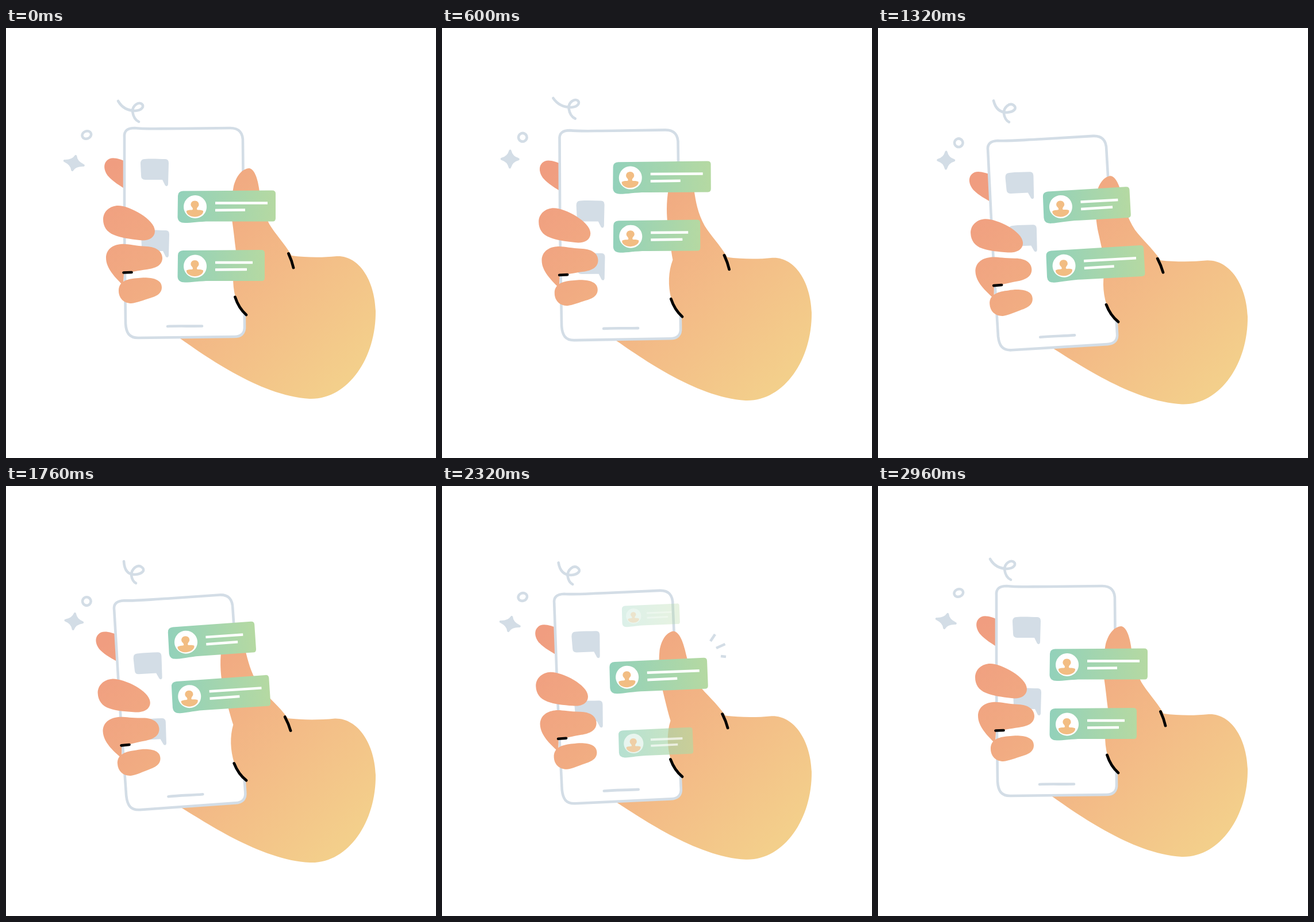
Write an HTML page with a canvas that moves like this. It is 748 px wide and 748 px high and loops after 3000 ms.

```html
<!DOCTYPE html>
<html lang="en">
<head>
<meta charset="utf-8">
<title>Phone in hand</title>
<style>
html, body { margin: 0; width: 100%; height: 100%; overflow: hidden; background: #fff; }
canvas { display: block; }
</style>
</head>
<body>
<canvas id="stage" width="748" height="748"></canvas>
<script>
const ctx = document.getElementById('stage').getContext('2d');
const LOOP = 3000, STEP = 40;
const GREY = '#d3dde6', SKIN = '#f2bd83';
const PIVOT = { x: 466, y: 500 };
const KEYS = [0, 600, 1000, 1320, 1760, 2320, 2960];

const clamp = v => Math.max(0, Math.min(1, v));
const mix = (a, b, k) => a + (b - a) * k;
const ease = v => (1 - Math.cos(Math.PI * clamp(v))) / 2;

// Smooth curve through keyed values, flat at both ends
function track(t, vals, keys = KEYS) {
  const last = keys.length - 1;
  if (t <= keys[0]) return vals[0];
  if (t >= keys[last]) return vals[last];
  let i = 0;
  while (t >= keys[i + 1]) i++;
  const slope = n => n === 0 || n === last ? 0
    : (vals[n + 1] - vals[n - 1]) / (keys[n + 1] - keys[n - 1]);
  const d = keys[i + 1] - keys[i], u = (t - keys[i]) / d, v = 1 - u;
  return vals[i] * (1 + 2 * u) * v * v + slope(i) * d * u * v * v
    + vals[i + 1] * u * u * (3 - 2 * u) - slope(i + 1) * d * u * u * v;
}

function fill(d, style) {
  ctx.fillStyle = style;
  ctx.fill(typeof d === 'string' ? new Path2D(d) : d);
}

function stroke(d, color = GREY, width = 4.6, cap = 'round') {
  ctx.strokeStyle = color;
  ctx.lineWidth = width;
  ctx.lineCap = cap;
  ctx.lineJoin = 'round';
  ctx.stroke(typeof d === 'string' ? new Path2D(d) : d);
}

function rotate(x, y, cx, cy, a) {
  const c = Math.cos(a), s = Math.sin(a), dx = x - cx, dy = y - cy;
  return [cx + dx * c - dy * s, cy + dx * s + dy * c];
}

function warp(d, fn) {
  return new Path2D(d.replace(/(-?[\d.]+) (-?[\d.]+)/g, (_, x, y) => fn(+x, +y).join(' ')));
}

function skin(dy) {
  const g = ctx.createLinearGradient(210, 210 + dy, 600, 600 + dy);
  g.addColorStop(0, '#f09d80');
  g.addColorStop(.33, '#f1ab82');
  g.addColorStop(.65, '#f3bc87');
  g.addColorStop(1, '#f3cf8b');
  return g;
}

const ARM = 'M290 531 C340 566 440 640 528 645 C594 647 644 575 643 492 C641 437 613 395 575 397 ' +
  'C548 400 520 399 497 396 L440 420 L400 500 Z';
const THUMB = 'M497 396 C484 374 468 358 458 341 C446 318 443 300 440 278 C437 258 431 245 423 244 ' +
  'C409 245 400 260 396 275 C391 300 392 325 394 340 C397 360 399 385 402 400 C394 420 393 445 399 468 ' +
  'C403 482 410 491 418 500 L470 520 L540 450 L540 430 L505 400 Z';
const PHONE = 'M206 190 C205 178 212 174 224 174 C240 176 260 175 300 175 L390 174 ' +
  'C405 174 413 182 412 200 L415 518 C416 532 408 537 397 537 L230 539 C214 539 209 530 208 514 L206 350 Z';
const FINGER_BACK = 'M215 235 C195 226 183 223 176 230 C168 237 171 250 178 258 C186 267 196 273 215 285 Z';
const FINGERS = [
  'M195 309 C215 309 259 333 259 353 C259 366 246 371 232 369 C215 367 200 365 188 360 ' +
  'C175 355 169 345 169 333 C169 318 182 309 195 309 Z',
  'M200 376 C212 375 222 379 245 380 C262 381 272 389 272 400 C272 413 260 418 245 420 ' +
  'C230 422 215 425 205 427 L204 446 L202 446 C190 434 174 418 174 400 C174 385 186 377 200 376 Z',
  'M230 435 C245 433 271 434 271 451 C271 463 260 467 250 470 C240 473 228 478 218 479 ' +
  'C205 479 196 470 196 457 C196 440 212 436 230 435 Z'
];

function bubble(x, y, alpha = 1) {
  if (alpha <= 0) return;
  ctx.save();
  ctx.globalAlpha = alpha;
  ctx.translate(x, y);
  fill('M7 0 C20 -1 32 0 43 0 Q49 0 49 7 L48 44 Q47 49 43 46 L38 36 L8 36 Q1 36 1 29 L0 8 Q0 0 7 0 Z', GREY);
  ctx.restore();
}

// y is the middle of the card
function card(wide, y, alpha = 1, scale = 1) {
  if (alpha <= 0) return;
  const w = wide ? 170 : 151;
  const g = ctx.createLinearGradient(0, 0, w, 0);
  g.addColorStop(0, '#92d1ba');
  g.addColorStop(1, '#b5d9a2');
  ctx.save();
  ctx.globalAlpha = alpha;
  ctx.translate(299 + w / 2, y);
  ctx.scale(scale, scale);
  ctx.translate(-w / 2, -27);
  fill(`M9 .5 L${w - 6} -.5 Q${w} -.5 ${w} 5 L${w} 48 Q${w} 54 ${w - 6} 53.5 L60 53.5 ` +
    'C40 53 25 56 12 56 Q0 56 -.5 46 L0 9 Q0 1 9 .5 Z', g);
  fill('M30 8 a20 20 0 1 0 .1 0 Z', '#fff');
  fill('M29.5 17.5 C34 17.5 37 21 36.5 25 C36 28 33 29 33 32 C33 35 38 32 44 35 ' +
    'C45 41 37 45.5 29.5 45.5 C22 45.5 14 41 15 35 C21 32 26 35 26 32 C26 29 23 28 22.5 25 ' +
    'C22 21 25 17.5 29.5 17.5 Z', SKIN);
  const ends = wide ? [156, 117] : [130, 120];
  stroke(`M65 21.5 L${ends[0]} 21.5`, '#fff', 4.5, 'butt');
  stroke(`M65 34 L${ends[1]} 33.5`, '#fff', 4.5, 'butt');
  ctx.restore();
}

function leaving(wide, y, p) {
  const u = clamp((p - .6) / .4);
  card(wide, y, 1 - u, 1 - .5 * u);
}

function arriving(wide, y, p) {
  const u = clamp((p - .6) / .4);
  card(wide, y + 180 * (1 - p), u, .55 + .45 * u);
}

function drawBubbles(p1, p2) {
  const first = p2 === 0, p = first ? p1 : p2;
  const [top, low, newTop, newLow, rise] = first ? [228, 352, 231, 323, 120] : [231, 323, 228, 352, 73];
  bubble(234, top - 120 * p, 1 - clamp(p / .35));
  bubble(mix(235, 234, p), mix(low, newTop, p));
  bubble(235, newLow + rise * (1 - p), clamp((p - .05) / .3));
}

function drawCards(p1, p2) {
  if (p2 === 0) {
    leaving(true, 310 - 118 * p1, p1);
    card(false, mix(413.5, 292.3, p1));
    arriving(true, 395.3, p1);
  } else {
    leaving(false, 292.3 - 36 * p2 - 60 * p2 * p2, p2);
    card(true, mix(395.3, 310, p2));
    arriving(false, 413.5, p2);
  }
}

function burst(u, x, y) {
  if (u <= 0 || u >= 1) return;
  const from = clamp(2 * u - 1), to = clamp(2 * u);
  for (const [x0, y0, x1, y1] of [[467, 270, 475, 258], [477, 282, 492.5, 275], [485, 296, 494, 297]]) {
    const px = k => mix(x0, x1, k) + x, py = k => mix(y0, y1, k) + y;
    stroke(`M${px(from)} ${py(from)} L${px(to)} ${py(to)}`, GREY, 4.6, 'butt');
  }
}

// k uncurls the tail and rounds the loop
function squiggle(t) {
  const y = track(t, [0, -6, -2, 3, 10, 11, 0]);
  const k = track(t, [0, -.16, .24, .6, 1, .76, 0]);
  ctx.save();
  ctx.translate(221 - 2 * k, 144 + y);
  stroke(`M${mix(-26, -14, k)} ${mix(-17, -23, k)} ` +
    `C${mix(-18, -13, k)} ${mix(-3, -6, k)} -6 0 ${mix(4, 5, k)} 0 ` +
    `C${mix(16, 19, k)} -1 ${mix(20, 24, k)} -8 ${mix(15, 17, k)} ${mix(-12, -13, k)} ` +
    `C9 ${mix(-16, -19, k)} -1 -9 -1 1 C0 8 3 ${mix(16, 13, k)} ${mix(10, 7, k)} ${mix(19, 15, k)}`);
  ctx.restore();
}

function ring(t, dy) {
  const round = track(t, [0, 1, 1, 1, 1, .2, 0]);
  ctx.save();
  ctx.translate(140.3, 186 + 1.4 * dy);
  ctx.rotate(-.35);
  ctx.beginPath();
  ctx.ellipse(0, 0, mix(8, 7.3, round), mix(6.6, 7.3, round), 0, 0, Math.PI * 2);
  ctx.strokeStyle = GREY;
  ctx.lineWidth = 4.6;
  ctx.stroke();
  ctx.restore();
}

function star(t) {
  const y = track(t, [235, 228, 227, 230, 235.5, 240, 235]);
  const turn = track(t, [14, 1, 1, 1, 7, 14, 14]);
  const rx = track(t, [17, 14.5, 14, 14, 15, 17, 17]);
  const ry = track(t, [12.5, 14.5, 14.5, 14.5, 13.5, 12.5, 12.5]);
  ctx.save();
  ctx.translate(118.3, y);
  ctx.rotate(turn * Math.PI / 180);
  const d = new Path2D(`M0 ${-ry} Q3 -3 ${rx} 0 Q3 3 0 ${ry} Q-3 3 ${-rx} 0 Q-3 -3 0 ${-ry} Z`);
  fill(d, GREY);
  stroke(d, GREY, 4);
  ctx.restore();
}

function draw(t) {
  const dy = track(t, [0, 3, 7, 9.8, 10.4, 5, 0]);
  const tilt = -track(t, [0, .27, 1.58, 2.8, 3.37, 2.02, 0]) * Math.PI / 180;
  const bend = -track(t, [0, .2, .7, 1.9, 3.3, 3.4, 0]) * Math.PI / 180;
  const p1 = ease((t - 240) / 760);
  const p2 = track(t, [0, .585, .87, 1], [1360, 1760, 2320, 2800]);
  const tone = skin(dy);

  // The thumb bends on its own; the arm follows the tilt less towards the wrist
  const flex = (x, y) => {
    const b = bend * clamp((430 - y) / 70) * clamp((510 - x) / 50);
    const [bx, by] = rotate(x, y, 440, 440, b);
    const w = clamp((643 - x) / 145) * clamp((660 - y) / 120);
    const [px, py] = rotate(bx, by, PIVOT.x, PIVOT.y, tilt * w);
    return [px, py + dy];
  };
  const inPhone = (fn, angle = tilt) => {
    ctx.save();
    ctx.translate(PIVOT.x, PIVOT.y + dy);
    ctx.rotate(angle);
    ctx.translate(-PIVOT.x, -PIVOT.y);
    fn();
    ctx.restore();
  };

  ctx.fillStyle = '#fff';
  ctx.fillRect(0, 0, 748, 748);
  squiggle(t);
  ring(t, dy);
  star(t);

  fill(warp(ARM, flex), tone);
  inPhone(() => {
    fill(FINGER_BACK, tone);
    fill(PHONE, '#fff');
    stroke(PHONE);
    stroke('M281 519 C300 518 320 519 341 518.5');
    drawBubbles(p1, p2);
    FINGERS.forEach(d => fill(d, tone));
    stroke('M204.5 425.5 L218.5 425', '#000', 4.6);
  });
  fill(warp(THUMB, flex), tone);
  inPhone(() => {
    stroke('M398.5 468 C403 482 409 491 418 499', '#000', 4.8);
    stroke('M491.5 392.5 C495 400 498 408 500 417', '#000', 4.8);
  });
  inPhone(() => drawCards(p1, p2), tilt * 1.12);
  burst((t - 720) / 400, -10, -21);
  burst((t - 2120) / 400, 0, 0);
}

function frame(now) {
  draw(Math.floor((now % LOOP) / STEP) * STEP);
  requestAnimationFrame(frame);
}
draw(0);
requestAnimationFrame(frame);
</script>
</body>
</html>
```
